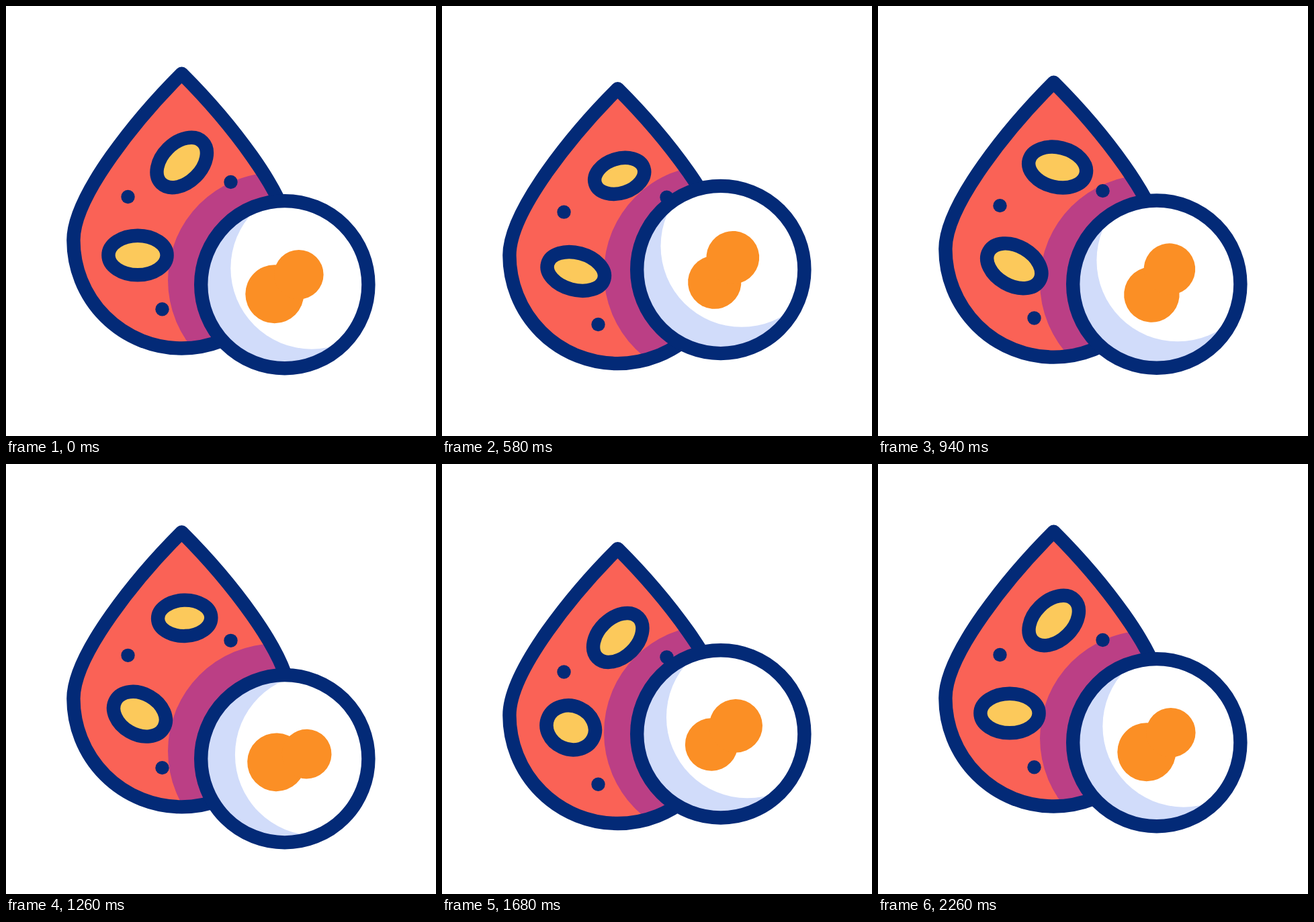
Recreate the animation shown at these times as an HTML page. Size 640 by 640 pixels, loop 2400 ms.

```html
<!DOCTYPE html>
<html lang="en">
<head>
<meta charset="utf-8">
<title>Drop and cell</title>
<style>
  html, body { margin: 0; width: 100%; height: 100%; overflow: hidden; background: #fff; }
  svg { display: block; width: 100vw; height: 100vh; }
  .line { stroke: #032a77; stroke-width: 20.4; stroke-linejoin: round; }
</style>
</head>
<body>
<svg viewBox="0 0 640 640">
  <defs>
    <path id="dropShape" d="M261.5 100.6C197 165 100.4 282 100.4 348.4A161.1 161.1 0 0 0 422.6 348.4C422.6 282 326 165 261.5 100.6Z"/>
    <clipPath id="dropClip"><use href="#dropShape"/></clipPath>
    <clipPath id="cellClip"><circle r="120"/></clipPath>
  </defs>
  <g id="drop">
    <use href="#dropShape" fill="#fa6256"/>
    <g clip-path="url(#dropClip)"><circle id="shadow" cx="401" r="160" fill="#bb3f85"/></g>
    <use href="#dropShape" class="line" fill="none"/>
    <g fill="#032a77">
      <circle cx="181.5" cy="284" r="10.2"/>
      <circle cx="334.5" cy="262" r="10.2"/>
      <circle cx="232.5" cy="451.3" r="10.2"/>
    </g>
    <ellipse id="podTop" class="line" fill="#fcc95b"/>
    <ellipse id="podLow" class="line" fill="#fcc95b"/>
  </g>
  <g id="cell">
    <circle r="124.6" fill="#d1dcfa"/>
    <g clip-path="url(#cellClip)"><circle id="light" r="120.5" fill="#fff"/></g>
    <g id="yolk" fill="#fb8f25">
      <circle id="lobeBig"/>
      <circle id="lobeSmall"/>
    </g>
    <circle class="line" r="124.6" fill="none"/>
  </g>
</svg>
<script>
const LOOP = 2400, STEP = 20;

// Smooth 0 to 1 between two times
function ease(t, from, to) {
  const p = Math.min(1, Math.max(0, (t - from) / (to - from)));
  return (1 - Math.cos(Math.PI * p)) / 2;
}

// Smooth 0 to 1 and back to 0
const pulse = (t, from, peak, to) => ease(t, from, peak) - ease(t, peak, to);

function set(id, attrs) {
  const node = document.getElementById(id);
  for (const name in attrs) node.setAttribute(name, attrs[name]);
}

function pod(id, x, y, rx, ry, turn) {
  set(id, { rx, ry, transform: `translate(${x} ${y}) rotate(${turn})` });
}

function drawDrop(t, fall, shadowY) {
  set('drop', { transform: `translate(0 ${fall})` });
  set('shadow', { cy: shadowY - fall });

  const squeeze = pulse(t, 200, 600, 940);
  const tilt = pulse(t, 200, 1010, 1720);
  const size = 1 - .13 * squeeze - .092 * pulse(t, 940, 1280, 1840);
  pod('podTop', 261.7 + 5.5 * tilt, 233 - 6.2 * tilt, 43.6 * size, 29.4 * size, 60 * tilt - 45);

  const out = pulse(t, 200, 980, 1680), back = pulse(t, 980, 1680, 2220);
  const lean = ease(t, 200, 950) - ease(t, 1480, 2200);
  pod('podLow', 196 + 6.8 * out - 4.3 * back, 371 + 2.7 * out - 4.1 * back,
    43.6 - 6.6 * back, 29.3 - 1.8 * squeeze + 2.8 * back, 30 * lean);
}

function drawCell(t, y, up, dip) {
  const spin = 32 * pulse(t, 800, 1410, 1800)
    - 24 * pulse(t, 200, 800, 1410) - 10 * pulse(t, 1410, 1800, 2260);
  const rad = (spin - 31.5) * Math.PI / 180;
  set('cell', { transform: `translate(414.8 ${y})` });
  set('light', { cx: 47 * Math.cos(rad), cy: 47 * Math.sin(rad) });
  set('yolk', { transform: `rotate(${spin})` });
  set('lobeBig', { cx: -15 + up + 6 * dip, cy: 14 + 1.4 * up - 4.6 * dip, r: 43.5 - 4.3 * up });
  set('lobeSmall', { cx: 21 + 1.7 * up + 6.2 * dip, cy: -15 + 3.2 * up - 5.2 * dip, r: 36.8 + 2.9 * up });
}

function draw(t) {
  // Two bounces with a dip of the cell between them
  const first = pulse(t, 200, 685, 1205);
  const dip = pulse(t, 685, 1205, 1680);
  const second = pulse(t, 1205, 1680, 2240);
  const up = first + second;
  drawDrop(t, 25.5 * up, 408 - 12.3 * first + 20.3 * dip - 8 * second);
  drawCell(t, 414.7 - 25 * first + 25.3 * dip - 12.8 * second, up, dip);
}

const start = performance.now();
function tick() {
  const t = (performance.now() - start) % LOOP;
  draw(Math.floor(t / STEP) * STEP);
  requestAnimationFrame(tick);
}
tick();
</script>
</body>
</html>
```
